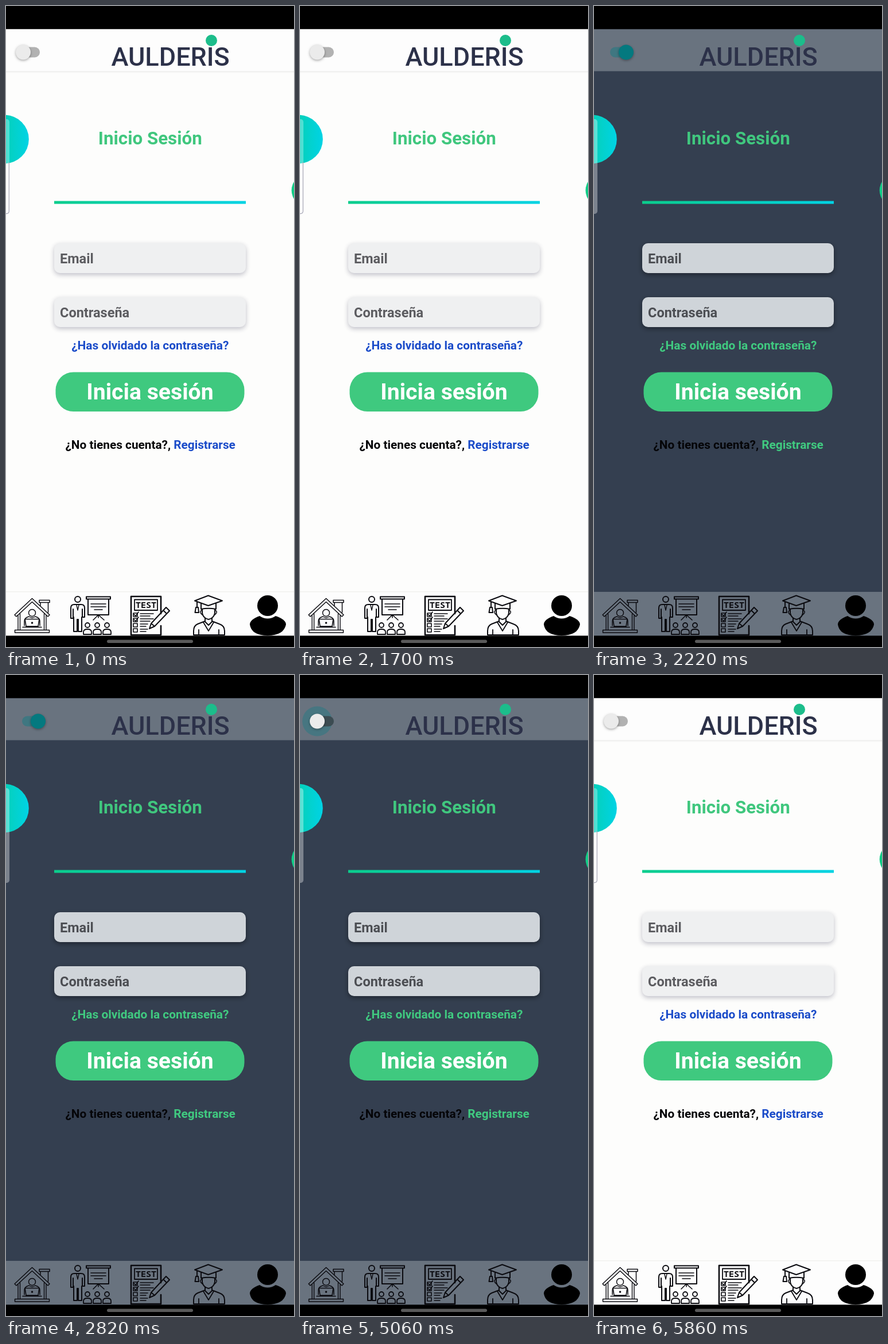
These frames come from a looping animation (502 by 1116 pixels, 8000 ms). An HTML page with a canvas:

```html
<!DOCTYPE html>
<html lang="es">
<head>
<meta charset="utf-8">
<title>Inicio Sesión</title>
<style>
html, body { margin: 0; width: 100%; height: 100%; overflow: hidden; background: #000; }
canvas { display: block; width: 100vw; height: 100vh; }
</style>
</head>
<body>
<canvas id="stage" width="502" height="1116"></canvas>
<script>
const ctx = document.getElementById('stage').getContext('2d');
const LOOP = 8000;
const ON = { press: 1680, slide: 1820, theme: 2220 };
const OFF = { press: 4640, slide: 4780, theme: 5160 };
const SLIDE = 250;
const INK = '#0b0b10';

const THEMES = {
  light: { body: '#fdfdfc', bar: '#fdfdfd', field: '#eff0f1', link: '#1a4bc9', hint: '#5c5c60',
           panel: 'rgba(255,255,255,.3)', edge: '#a3a3b4', shadow: 'rgba(30,30,60,.28)',
           trackOff: '#b2b2b2', trackOn: '#7fb7b8' },
  dark: { body: '#343f50', bar: '#69737f', field: '#cfd4d9', link: '#40ca80', hint: '#4c4e53',
          panel: 'rgba(255,255,255,.35)', edge: null, shadow: 'rgba(0,0,0,.4)',
          trackOff: '#3c4c52', trackOn: '#3f7781' }
};

const clamp = v => Math.max(0, Math.min(1, v));
const ease = v => (1 - Math.cos(Math.PI * clamp(v))) / 2;

function rect(x, y, w, h, color) {
  ctx.fillStyle = color;
  ctx.fillRect(x, y, w, h);
}

function round(x, y, w, h, r, color) {
  ctx.beginPath();
  ctx.roundRect(x, y, w, h, r);
  ctx.fillStyle = color;
  ctx.fill();
}

function disc(x, y, r, color) {
  ctx.beginPath();
  ctx.arc(x, y, r, 0, Math.PI * 2);
  ctx.fillStyle = color;
  ctx.fill();
}

function text(str, x, y, size, color, align = 'left', weight = 700) {
  ctx.font = `${weight} ${size}px Roboto, sans-serif`;
  ctx.textAlign = align;
  ctx.fillStyle = color;
  ctx.fillText(str, x, y);
}

function blend(x0, x1) {
  const g = ctx.createLinearGradient(x0, 0, x1, 0);
  g.addColorStop(0, '#0bcd8c');
  g.addColorStop(1, '#00d3e4');
  return g;
}

function shadowed(color, blur, dy, draw) {
  ctx.save();
  ctx.shadowColor = color;
  ctx.shadowBlur = blur;
  ctx.shadowOffsetY = dy;
  draw();
  ctx.restore();
}

function line(path, width = 2) {
  ctx.lineWidth = width;
  ctx.stroke(new Path2D(path));
}

const ring = (x, y, r) => `M${x - r} ${y}a${r} ${r} 0 1 1 ${2 * r} 0a${r} ${r} 0 1 1 ${-2 * r} 0`;

function house() {
  line('M15 1060L45.5 1031.5L76 1060L73 1063L45.5 1037.5L18 1063Z', 1.5);
  line('M21 1061V1086M70 1061V1086M24.5 1058V1086M66.5 1058V1086', 1.4);
  line('M15.5 1086.5H75.5V1091H15.5Z', 1.5);
  line('M60 1044V1038.5M73.5 1038.5V1056M58 1034.5H76V1038.5H58Z', 1.5);
  line(ring(45.5, 1056.5, 6), 1.5);
  line('M32 1079V1071Q32 1065 40 1063Q45.5 1067 51 1063Q59 1065 59 1071V1079', 1.5);
  line('M35 1080L33 1067.5H58L56 1080ZM29 1081.5H62', 1.6);
  disc(45.5, 1074, 1.8, INK);
}

function lesson() {
  line(ring(125, 1033, 5));
  line('M119 1042H131Q137 1042 137 1048V1064H133V1050M119 1042Q113 1042 113 1048V1066H117V1050M118 1064V1089H124V1068H126V1089H132V1064');
  line('M123 1043L125 1052L127 1043', 1.4);
  line('M140 1028.5H182V1032.5H140ZM143 1033V1060H179V1033');
  line('M148 1041H174M148 1046H174M154 1051H168M161 1060V1065M160 1061L152 1069M162 1061L171 1069', 1.6);
  for (const x of [142, 159, 176]) {
    line(ring(x, 1078, 4), 1.8);
    line(`M${x - 7} 1094V1090Q${x - 7} 1085 ${x} 1085Q${x + 7} 1085 ${x + 7} 1090V1094Z`, 1.8);
  }
}

function exam() {
  line('M270 1058V1028H218V1095H270V1079', 2.6);
  line('M224 1033.5H264V1052H224Z', 1.8);
  ctx.font = '700 15px "Noto Sans Mono", monospace';
  ctx.textAlign = 'center';
  ctx.fillStyle = INK;
  ctx.fillText('TEST', 244, 1048);
  for (let i = 0; i < 4; i++) {
    const y = 1057 + i * 9;
    line(`M222 ${y}H229V${y + 6}H222Z`, 1.6);
    if (i < 2) line(`M223 ${y + 2}L226 ${y + 5}L231 ${y - 2}`, 1.6);
    line(`M234 ${y + 1}H${i < 2 ? 257 : 247}M234 ${y + 5}H${i < 2 ? 251 : 244}`, 1.5);
  }
  line('M250 1084L253 1075L279 1047L285 1053L259 1080ZM253 1075L259 1080M274 1052L280 1058');
}

function graduate() {
  line('M329 1035.5L352.5 1026.5L377 1035.5L352.5 1044Z');
  line('M340 1040V1050Q353 1047.5 366 1050V1040');
  line('M333 1037V1047M331 1047H335L336 1056H329.5Z');
  line('M342 1050V1057Q344 1066 353 1068Q362 1066 364 1057V1050');
  line('M341 1052Q336 1055 342 1060M365 1052Q370 1055 364 1060', 1.6);
  line('M347 1066V1072L353 1078L359 1072V1066');
  line('M347 1071L334 1076Q327 1079 327 1088V1095H381V1088Q381 1079 372 1076L359 1071');
  line('M336 1086V1095M371 1086V1095M344 1073L353 1088L362 1073', 1.8);
}

function profile() {
  disc(456, 1044, 18, '#000');
  ctx.fill(new Path2D('M442 1062Q456 1071 470 1062Q488 1068 488 1077Q484 1096 456 1096Q428 1096 425 1077Q425 1068 442 1062Z'));
}

function field(label, y, c) {
  shadowed(c.shadow, 8, 3, () => round(84, y, 334, 52, 10, c.field));
  text(label, 94, y + 35, 23.5, c.hint);
}

function toggle(t, c) {
  const move = ease((t - ON.slide) / SLIDE) - ease((t - OFF.slide) / SLIDE);
  const checked = t >= ON.slide && t < OFF.slide;
  const x = 30 + 26 * move;
  for (const k of [ON, OFF]) {
    if (t < k.press || t >= k.theme) continue;
    const grow = ease((t - k.press) / 225);
    ctx.globalAlpha = clamp((t - k.press) / 75);
    disc(x, 80.5, 8 + 18 * grow, k === ON ? 'rgba(0,0,0,.13)' : 'rgba(0,125,133,.32)');
    ctx.globalAlpha = 1;
  }
  round(28, 71.5, 31, 18, 9, checked ? c.trackOn : c.trackOff);
  shadowed('rgba(0,0,0,.35)', 4, 1.5, () => disc(x, 80.5, 13, checked ? '#04797f' : '#ebebeb'));
}

function edges(c) {
  disc(-2.4, 232, 42.2, blend(-45, 39));
  disc(525.7, 321, 28, '#12cd87');
  round(-10, 197, 16, 165, 5, c.panel);
  if (c.edge) {
    ctx.strokeStyle = c.edge;
    ctx.lineWidth = 1.2;
    ctx.stroke(new Path2D('M5.3 272V357Q5.3 361.6 0 361.6'));
  }
}

function form(c) {
  text('Inicio Sesión', 251.3, 240.7, 31.3, '#40c77e', 'center');
  rect(84, 339.5, 334, 5, blend(84, 418));
  field('Email', 413, c);
  field('Contraseña', 507, c);
  text('¿Has olvidado la contraseña?', 251.3, 598.3, 20.85, c.link, 'center');
  round(86.5, 637.5, 329, 68.5, 31, '#3fc97f');
  text('Inicia sesión', 251, 685, 39.2, '#fff', 'center');
  const ask = '¿No tienes cuenta?, ';
  text(ask, 103.5, 771.3, 20.8, '#050508');
  text('Registrarse', 103.5 + ctx.measureText(ask).width, 771.3, 20.8, c.link);
}

function header(t, c) {
  rect(0, 40.5, 502, 73, c.bar);
  if (c === THEMES.light) {
    rect(0, 113.5, 502, 1.2, '#e9e9e7');
    rect(0, 114.7, 502, 1.5, '#f6f6f4');
  }
  text('AULDERIS', 286.5, 104, 45, '#2c3149', 'center', 500);
  disc(358, 60, 10, '#1cbd8b');
  toggle(t, c);
}

function footer(c) {
  rect(0, 1020, 502, 77, c.bar);
  if (c === THEMES.light) rect(0, 1019, 502, 1.5, '#f1f1ef');
  ctx.strokeStyle = INK;
  ctx.lineJoin = ctx.lineCap = 'round';
  house();
  lesson();
  exam();
  graduate();
  profile();
  rect(0, 1096.3, 502, 20, '#000');
  round(176, 1103.5, 150, 5.5, 2.75, '#5a5a5a');
}

function render(t) {
  const c = t >= ON.theme && t < OFF.theme ? THEMES.dark : THEMES.light;
  rect(0, 0, 502, 1116, c.body);
  rect(0, 0, 502, 40.5, '#000');
  header(t, c);
  form(c);
  edges(c);
  footer(c);
}

const start = performance.now();
function tick() {
  render((performance.now() - start) % LOOP);
  requestAnimationFrame(tick);
}
tick();
</script>
</body>
</html>
```
